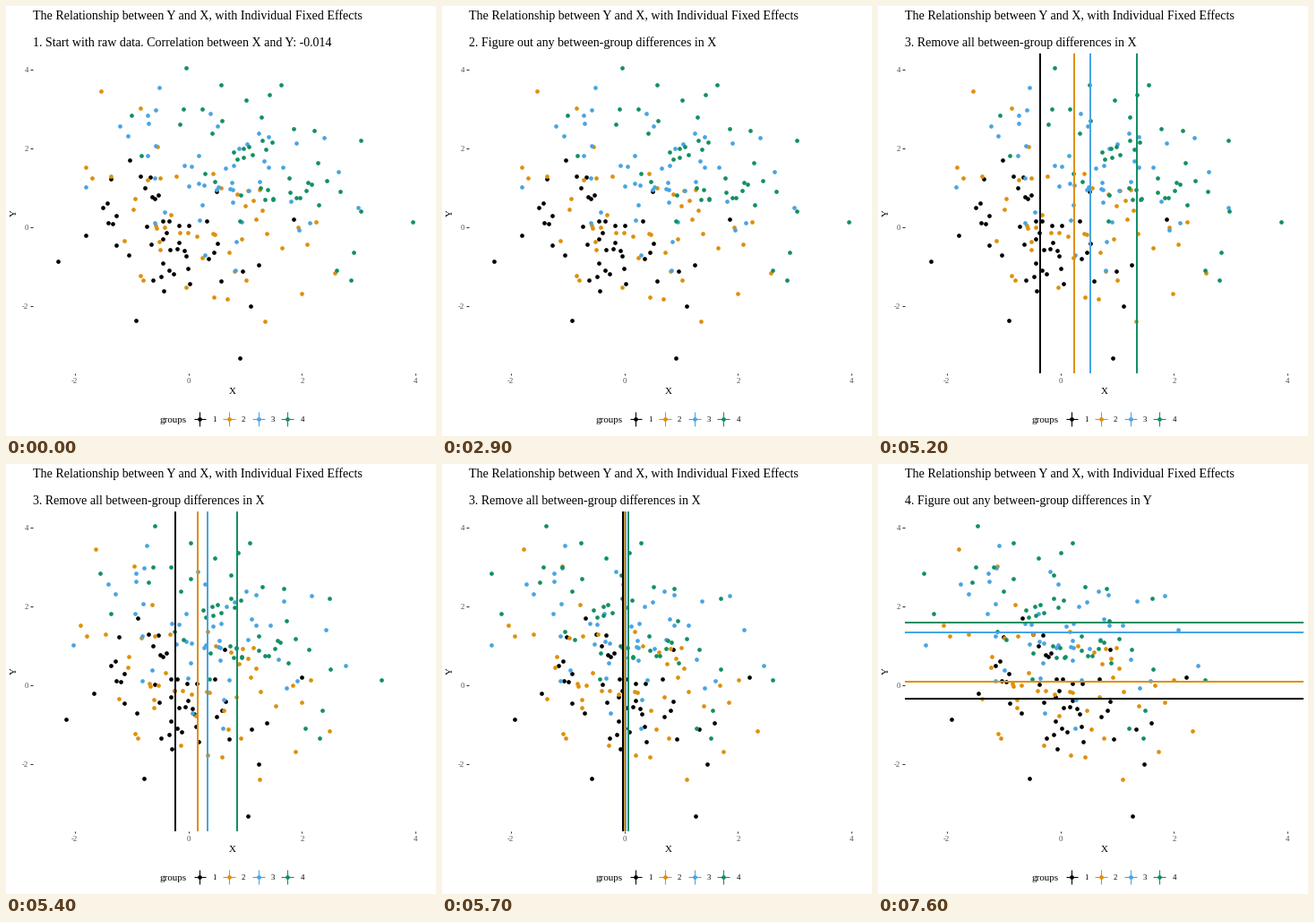
A matplotlib script for the animation above (8 s loop, 480 px wide and 480 px high).

```python
import math

import matplotlib.pyplot as plt
import numpy as np
from matplotlib.animation import FuncAnimation

SIZE, STEP, LOOP = 480, 100, 8000
LEFT, RIGHT, TOP, BOTTOM = 30, 475, 53, 410
X0, Y0, XU, YU = 203.5, 246.8, 63.45, 43.85   # plot origin and units, in pixels

HEAD = "The Relationship between Y and X, with Individual Fixed Effects"
STAGES = [
    (0, "1. Start with raw data. Correlation between X and Y: -0.014"),
    (2900, "2. Figure out any between-group differences in X"),
    (5200, "3. Remove all between-group differences in X"),
    (7000, "4. Figure out any between-group differences in Y"),
]
V_ON, V_OFF, H_ON = 3200, 7000, 7600
MOVE_START, MOVE_TIME = 5100, 700

COLORS = ["#000000", "#DE900B", "#48A4E3", "#128F63"]
MEANS = [(-0.37, -0.34), (0.26, 0.09), (0.56, 1.345), (1.41, 1.6)]
SPREADS = [(0.5, 0.65), (0.7, 0.85), (0.7, 0.65), (0.6, 0.6)]
GROUP_SIZE = 50

# Outlying points of each group; the dense middle is drawn at random.
OUTER = [
    [(-2.29, -.88), (-1.81, -.21), (-1.43, .6), (-1.37, 1.23), (-1.33, .08),
     (-1.04, 1.7), (-.92, -2.38), (-.85, 1.3), (-.76, .99), (-.43, -1.62),
     (.03, -1.44), (.5, .9), (.57, -1.38), (.9, -3.34), (.96, -1.12),
     (1.1, -2.02), (1.23, -.96), (1.85, .2)],
    [(-1.8, 1.53), (-1.69, 1.26), (-1.53, 3.46), (-1.36, 1.3), (-1.12, -.34),
     (-.85, 3.03), (-.94, .72), (-.84, -1.23), (-.54, 2.04), (-.5, -.57),
     (.69, -1.82), (1.35, -2.39), (1.64, -.52), (1.93, 0), (1.99, -1.69),
     (2.09, -.43), (2.25, .14), (2.58, -1.17)],
    [(-1.81, 1.02), (-1.2, 2.57), (-1.06, 2.32), (-.71, 2.84), (-.52, 3.55),
     (-.57, 2.99), (-.58, 2.07), (-.59, .11), (.38, 2.89), (.29, -.71),
     (.82, -1.09), (.84, -.37), (1.23, 2.39), (1.9, 2.14), (1.95, -.07),
     (2.39, 2.27), (2.64, 1.42), (2.98, .49)],
    [(-1, 2.84), (-.82, 1.83), (-.04, 4.05), (-.15, 2.62), (-.08, 3),
     (.24, 3), (.58, 3.62), (.59, 2.71), (1.02, 3.23), (1.42, 3.36),
     (1.63, 3.62), (1.29, 2.81), (2.22, 2.45), (3.03, 2.2), (3.04, .41),
     (3.95, .14), (2.9, -.65), (2.86, -1.35), (2.61, -1.11), (2.3, .57)],
]

rng = np.random.default_rng(14)


def make_group(outer, mean, spread):
    """Fill up a group so that it has exactly the given mean."""
    outer = np.array(outer, float)
    n = GROUP_SIZE - len(outer)
    core = rng.uniform(-1, 1, (n, 2)) + rng.uniform(-1, 1, (n, 2))
    core = (core - core.mean(0)) / core.std(0) * spread
    core += (GROUP_SIZE * np.array(mean) - outer.sum(0)) / n
    return np.vstack([outer, core])


groups = [make_group(*g) for g in zip(OUTER, MEANS, SPREADS)]

plt.rcParams["font.family"] = "Liberation Serif"
plt.rcParams["axes.unicode_minus"] = False
fig = plt.figure(figsize=(SIZE / 72, SIZE / 72), dpi=72, facecolor="white")


def px(x):
    return X0 + XU * np.asarray(x)


def py(y):
    return Y0 - YU * np.asarray(y)


ax = fig.add_axes([0, 0, 1, 1])
ax.set(xlim=(0, SIZE), ylim=(SIZE, 0))
ax.axis("off")


def label(x, y, text, size, color="black", **kw):
    return ax.text(x, y, text, fontsize=size, color=color, **kw)


def segment(xs, ys, color, width, z=1):
    return ax.plot(xs, ys, color=color, lw=width, zorder=z,
                   solid_capstyle="butt")[0]


# Titles and axes
label(LEFT, 15, HEAD, 14)
subtitle = label(LEFT, 45, "", 14)
label(252.5, 433, "X", 11, ha="center")
label(9, 231.5, "Y", 11, rotation=90, ha="center", va="center")
for v in (-2, 0, 2, 4):
    x, y = px(v), py(v)
    segment([x, x], [BOTTOM - .5, BOTTOM + 2.3], "#333333", 1.07)
    label(x, 421, str(v), 8.8, "#4D4D4D", ha="center")
    segment([LEFT - 2.8, LEFT], [y, y], "#333333", 1.07)
    label(25, y + 3, str(v), 8.8, "#4D4D4D", ha="right")

# Legend
label(172, 465, "groups", 11)
for k, color in enumerate(COLORS):
    x, y = 216.4 + 32.65 * k, 461
    segment([x - 6.9, x + 6.9], [y, y], color, 1.07)
    segment([x, x], [y - 8, y + 8], color, 1.07)
    ax.plot(x, y, "o", ms=4.7, mew=0, color=color)
    label(x + 14, 464, str(k + 1), 8.8)

# Moving parts
dots, vlines, hlines = [], [], []
for k, color in enumerate(COLORS):
    dots.append(ax.plot([], [], "o", ms=4.7, mew=0, color=color, zorder=3)[0])
    vlines.append(segment([0, 0], [TOP, BOTTOM], color, 2, 4))
    y = py(MEANS[k][1])
    hlines.append(segment([LEFT, RIGHT], [y, y], color, 2, 5))


def ease(p):
    p = min(max(p, 0), 1)
    return (1 - math.cos(math.pi * p)) / 2


def update(i):
    t = i * STEP
    subtitle.set_text([s for start, s in STAGES if t >= start][-1])
    p = ease((t - MOVE_START) / MOVE_TIME)
    for k, (mx, _) in enumerate(MEANS):
        pts = groups[k]
        dots[k].set_data(px(pts[:, 0] - p * mx), py(pts[:, 1]))
        x = px(mx * (1 - p))
        vlines[k].set_xdata([x, x])
        vlines[k].set_visible(V_ON <= t < V_OFF)
        hlines[k].set_visible(t >= H_ON)
    return [subtitle, *dots, *vlines, *hlines]


anim = FuncAnimation(fig, update, frames=LOOP // STEP, interval=STEP,
                     repeat=True, repeat_delay=0, blit=False)
plt.show()
```
